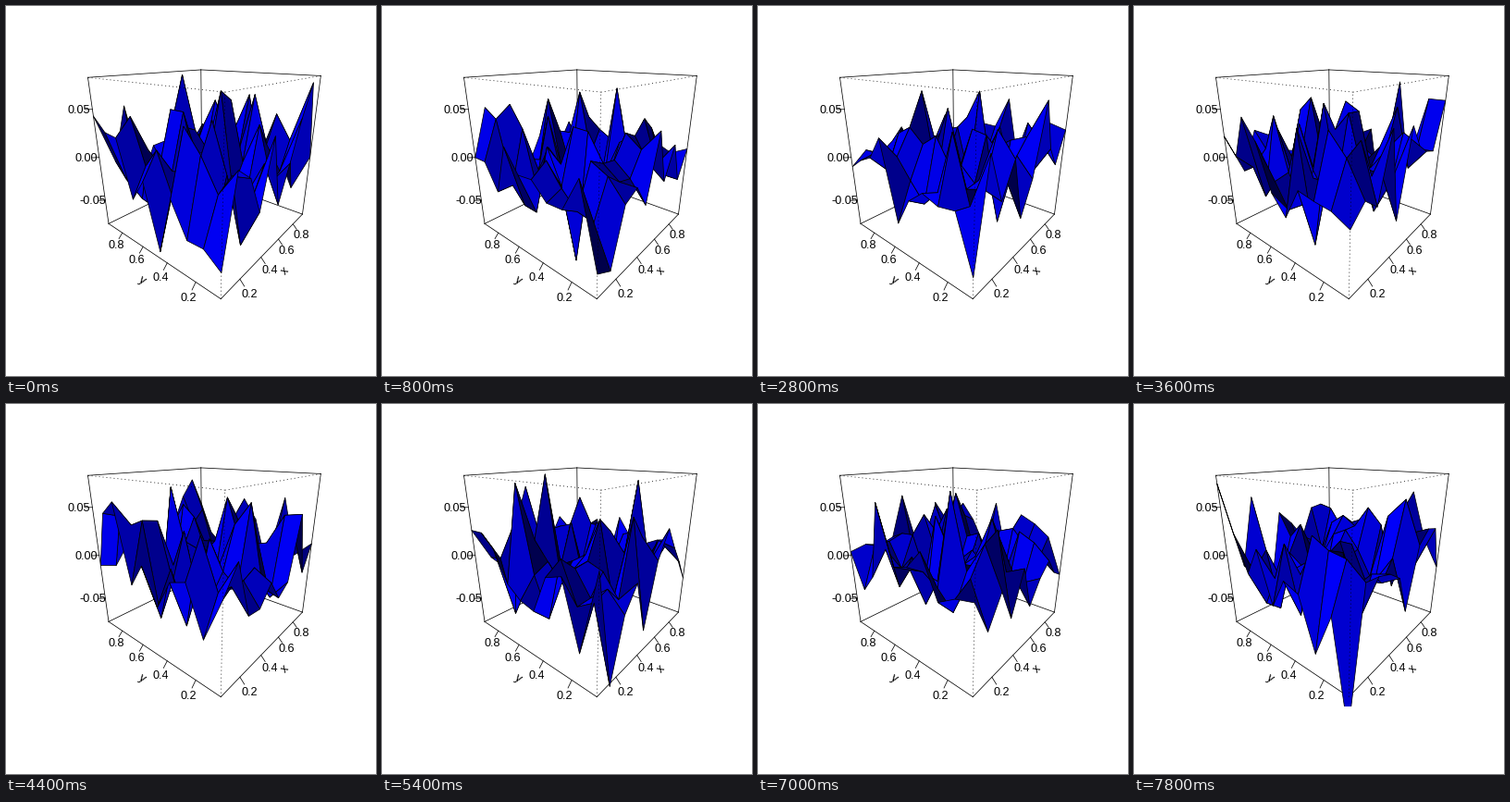
A matplotlib script for the animation above (8000 ms loop, 400 px wide and 400 px high).

```python
import math

import numpy as np
import matplotlib.pyplot as plt
from matplotlib.animation import FuncAnimation
from matplotlib.collections import PolyCollection
from matplotlib.patches import Rectangle

SIZE, DPI = 400, 100
PX = 72 / DPI                      # one pixel in points
FRAMES, INTERVAL = 40, 200
SEED = 8
N = 10                             # grid points per side
SPREAD = 0.39                      # height deviation, half-box units
SHADE = 0.4
LIGHT = np.array([-1, 1, 0]) / math.sqrt(2)
TEXT = 12.6                        # text size in pixels

plt.rcParams["font.family"] = "Liberation Sans"
plt.rcParams["lines.scale_dashes"] = False

# plot region in pixels, margins counted in lines of 14.4 px
LINE = 14.4
LEFT, TOP = 4.1 * LINE, 4.1 * LINE
WIDTH = SIZE - LEFT - 2.1 * LINE
HEIGHT = SIZE - TOP - 5.1 * LINE

TURN, TILT = math.radians(50), math.radians(20)
CT, ST = math.cos(TURN), math.sin(TURN)
CP, SP = math.cos(TILT), math.sin(TILT)
EYE = 2 + math.sqrt(3)


def plane(x, y, z):
    """Perspective coordinates of a point in the [-1, 1] cube."""
    u = CT * x - ST * y
    t = -ST * x - CT * y
    w = EYE - CP * t - SP * z
    return u / w, (CP * z - SP * t) / w


corners = np.array([plane(x, y, z) for x in (-1, 1) for y in (-1, 1) for z in (-1, 1)])
low, high = corners.min(0), corners.max(0)
SCALE = min(WIDTH / (high[0] - low[0]), HEIGHT / (high[1] - low[1])) / 1.08
CX = LEFT + WIDTH / 2 - SCALE * (low[0] + high[0]) / 2
CY = TOP + HEIGHT / 2 + SCALE * (low[1] + high[1]) / 2


def project(x, y, z):
    u, v = plane(x, y, z)
    return CX + SCALE * u, CY - SCALE * v


axis = np.linspace(-1, 1, N)
GX, GY = np.meshgrid(axis, axis, indexing="ij")
STEP = axis[1] - axis[0]
# cells from far to near
CELLS = sorted(((i, j) for i in range(N - 1) for j in range(N - 1)),
               key=lambda c: -ST * axis[c[0]] - CT * axis[c[1]])


def heights(frame):
    """Fresh normal noise for every frame."""
    return np.random.default_rng([SEED, frame]).normal(0, SPREAD, (N, N))


def shade(z, i, j):
    a = (STEP, -STEP, z[i + 1, j] - z[i, j + 1])
    b = (STEP, STEP, z[i + 1, j + 1] - z[i, j])
    normal = np.cross(a, b)
    lit = normal @ LIGHT / np.linalg.norm(normal)
    return (0, 0, (0.5 * (lit + 1)) ** SHADE)


fig = plt.figure(figsize=(SIZE / DPI, SIZE / DPI), dpi=DPI, facecolor="white")
ax = fig.add_axes([0, 0, 1, 1])
ax.set_xlim(0, SIZE)
ax.set_ylim(SIZE, 0)
ax.axis("off")


def segment(p, q, style="-", order=1):
    (x0, y0), (x1, y1) = project(*p), project(*q)
    ax.plot([x0, x1], [y0, y1], color="black", lw=0.75 * PX, ls=style,
            dash_capstyle="butt", zorder=order)


def label(point, text, angle=0):
    x, y = project(*point)
    ax.text(x + 0.8, y + 0.8, text, size=TEXT * PX, ha="center", va="center",
            rotation=angle, rotation_mode="anchor", zorder=2)


def tick(point, out, text):
    p, d = np.array(point), np.array(out)
    segment(p, p + 0.06 * d)
    label(p + 0.12 * d, text)


def slope(p, q):
    (x0, y0), (x1, y1) = project(*p), project(*q)
    return math.degrees(math.atan2(y0 - y1, x1 - x0))


# box: the three edges meeting at the near top corner are dotted
NEAR = (-1, -1, 1)
DOTS = (0, (1 * PX, 3 * PX))
for k in range(3):
    for a in (-1, 1):
        for b in (-1, 1):
            p = [a, b]
            p.insert(k, -1)
            q = p[:k] + [1] + p[k + 1:]
            if NEAR in (tuple(p), tuple(q)):
                segment(p, q, DOTS, 5)
            else:
                segment(p, q)

for value in (0.2, 0.4, 0.6, 0.8):
    pos = (value - 0.5) / 0.45
    tick((pos, -1, -1), (0, -1, -1), f"{value:.1f}")
    tick((-1, pos, -1), (-1, 0, -1), f"{value:.1f}")
for value in (-0.05, 0, 0.05):
    tick((-1, 1, value / 0.08), (-1, 1, 0), f"{value:.2f}")

label((0, -1.22, -1.22), "x", slope((-1, -1, -1), (1, -1, -1)))
label((-1.22, 0, -1.22), "y", slope((-1, 1, -1), (-1, -1, -1)))

surface = PolyCollection([], edgecolors="black", linewidths=0.75 * PX,
                         joinstyle="round", zorder=3)
ax.add_collection(surface, autolim=False)
surface.set_clip_path(Rectangle((LEFT, TOP), WIDTH, HEIGHT, transform=ax.transData))


def update(frame):
    z = heights(frame)
    pts = np.stack(project(GX, GY, z), axis=-1)
    surface.set_verts([[pts[i, j], pts[i + 1, j], pts[i + 1, j + 1], pts[i, j + 1]]
                       for i, j in CELLS])
    surface.set_facecolor([shade(z, i, j) for i, j in CELLS])
    return [surface]


anim = FuncAnimation(fig, update, frames=FRAMES, interval=INTERVAL,
                     repeat=True, repeat_delay=0, blit=False)
plt.show()
```
